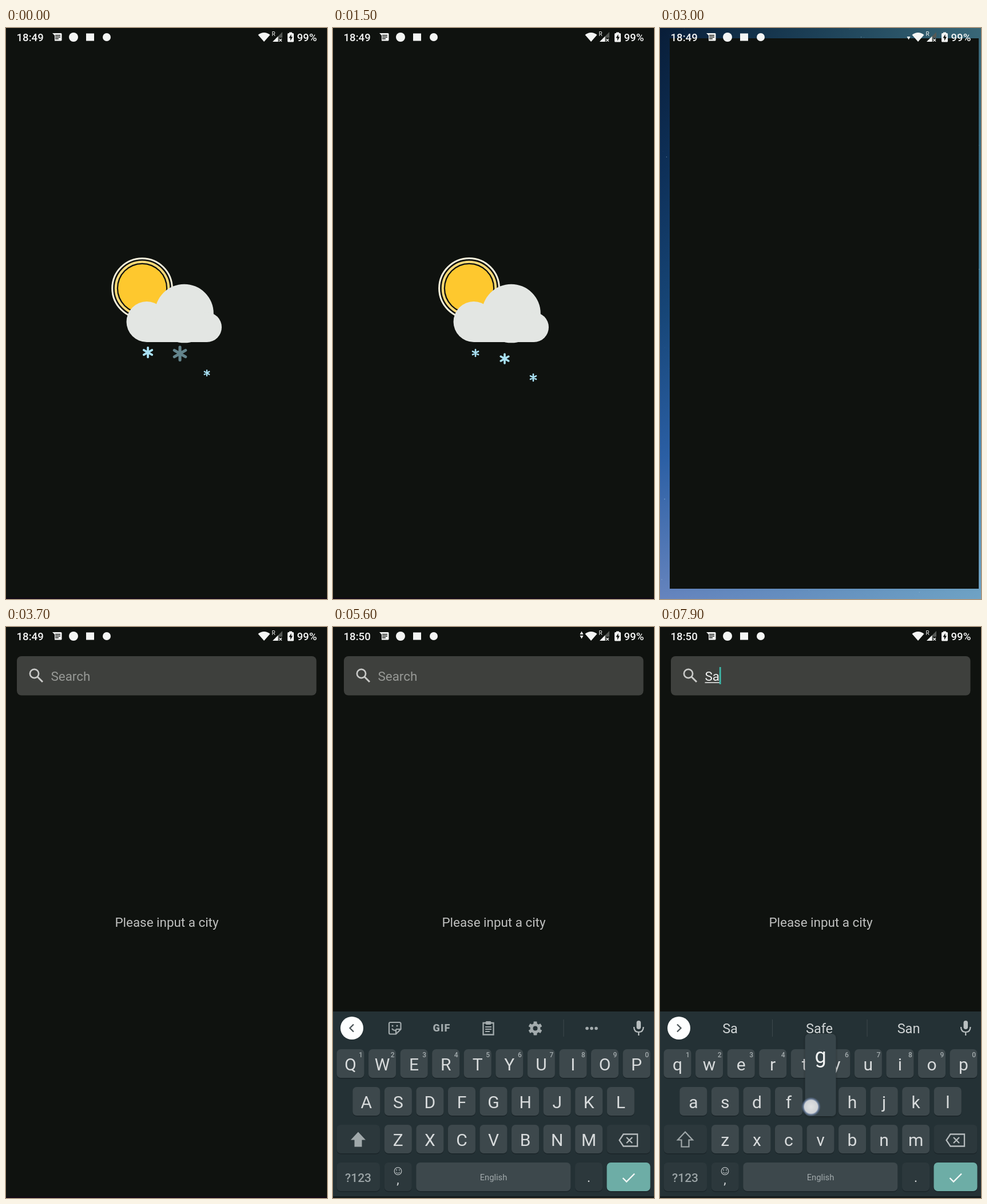
Write an HTML page with a canvas that moves like this. It is 561 by 998 pixels and loops after 8 s.

```html
<!DOCTYPE html>
<html lang="en">
<head>
<meta charset="utf-8">
<title>Weather app</title>
<style>
html, body { margin: 0; width: 100%; height: 100%; overflow: hidden; background: #0f120f; }
canvas { display: block; }
</style>
</head>
<body>
<canvas id="stage" width="561" height="998"></canvas>
<script>
const c = document.getElementById('stage').getContext('2d');
const W = 561, H = 998, LOOP = 8000, STEP = 100, SNOW = 1350, PITCH = 55.56;
const BG = '#0f120f', ICON = '#a3abad', LABEL = '#d8dbdc', KEY = '#3d484c', DARK_KEY = '#2c383c', BOARD = '#243135';

function box(x, y, w, h, r, color) {
  c.fillStyle = color;
  c.beginPath();
  c.roundRect(x, y, w, h, r);
  c.fill();
}
function disc(x, y, r, color) {
  c.fillStyle = color;
  c.beginPath();
  c.arc(x, y, r, 0, 7);
  c.fill();
}
function ring(x, y, r, width, color) {
  c.strokeStyle = color;
  c.lineWidth = width;
  c.beginPath();
  c.arc(x, y, r, 0, 7);
  c.stroke();
}
function shape(path, color, width) {
  const p = new Path2D(path);
  if (width) {
    c.strokeStyle = color;
    c.lineWidth = width;
    c.stroke(p);
  } else {
    c.fillStyle = color;
    c.fill(p);
  }
}
function text(s, x, y, size, color, align = 'left', weight = 400) {
  c.font = `${weight} ${size}px Roboto, sans-serif`;
  c.textAlign = align;
  c.fillStyle = color;
  c.fillText(s, x, y);
}
const between = (t, a, b) => t >= a && t < b;

// Snowflake keys: time, x, y, radius, opacity
const flakes = [
  [[0, 248, 567, 10, 1], [150, 249, 568, 7, 1], [700, 244, 620, 7, 1], [850, 242, 630, 5, 0], [1100, 250, 556, 12, 0]],
  [[0, 304, 569, 13.5, .55], [150, 300, 578, 9.5, 1], [800, 306, 624, 7, 1], [950, 308, 630, 5, 0], [1200, 306, 556, 14, 0]],
  [[0, 351, 603, 6, 1], [150, 350, 611, 7, 1], [400, 346, 626, 6, 1], [500, 345, 630, 5, 0], [700, 352, 560, 12, 0], [850, 351, 568, 9, 1]]
];
function flake(keys, t) {
  const all = [...keys, [SNOW, ...keys[0].slice(1)]];
  const i = all.findIndex(k => k[0] > t);
  const a = all[i - 1], b = all[i], f = (t - a[0]) / (b[0] - a[0]);
  const [, x, y, r, alpha] = a.map((v, j) => v + (b[j] - v) * f);
  c.save();
  c.globalAlpha = alpha;
  c.translate(x, y);
  c.lineCap = 'round';
  c.strokeStyle = '#a9e1f4';
  c.lineWidth = r * .38;
  c.beginPath();
  for (let j = 0; j < 3; j++) {
    const s = Math.sin(j * Math.PI / 3) * r * .83, k = Math.cos(j * Math.PI / 3) * r * .83;
    c.moveTo(s, k);
    c.lineTo(-s, -k);
  }
  c.stroke();
  c.restore();
}

function splash(t) {
  const phase = t % SNOW, grow = .6 * (1 - Math.cos(phase / SNOW * 2 * Math.PI));
  ring(238, 455, 52.3 + grow, 3, '#f6f1dc');
  ring(238, 455, 46.2 + grow / 2, 4, '#fbd977');
  disc(238, 455, 42, '#fec82e');
  flakes.forEach(k => flake(k, phase));
  const cloud = '#e3e6e3';
  disc(246, 513.5, 35.5, cloud);
  disc(311.5, 499, 51.3, cloud);
  disc(351, 523, 26, cloud);
  box(246, 513, 105, 36, 0, cloud);
}

function wallpaper() {
  const down = c.createLinearGradient(0, 0, 0, H);
  ['#081d38', '#0d2f58', '#164577', '#2a5ea4', '#6684be'].forEach((s, i) => down.addColorStop(i / 4, s));
  box(0, 0, W, H, 0, down);
  const across = c.createLinearGradient(0, 0, W, 0);
  across.addColorStop(0, 'rgba(90,190,195,0)');
  across.addColorStop(1, 'rgba(125,205,205,.42)');
  box(0, 0, W, H, 0, across);
  let seed = 7;
  const rnd = () => (seed = seed * 16807 % 2147483647) / 2147483647;
  for (let i = 0; i < 420; i++) {
    disc(rnd() * W, rnd() * H, .3 + rnd() * .6, `rgba(190,220,235,${rnd() * .6})`);
  }
}

// The new window grows towards the full stage
function opening(t) {
  const k = [7, 3, 1, .3, 0][(t - 2800) / STEP];
  wallpaper();
  c.globalAlpha = t < 2900 ? .6 : 1;
  box(17 * k, 18 * k, W - 21 * k, H - 36 * k, 0, BG);
  c.globalAlpha = 1;
}

function statusBar(t) {
  const white = '#f4f5f4';
  text(t < 5600 ? '18:49' : '18:50', 18.5, 23.3, 18.6, white, 'left', 500);
  shape('M81 9H96Q97.500 9 97.500 10.500V21Q97.500 22.500 96 22.500H85V13Z', white);
  [[86, 12, 9], [86, 15, 9], [86, 18, 6]].forEach(([x, y, w]) => box(x, y, w, 1.5, 0, BG));
  disc(118, 16, 8, white);
  box(140, 9.500, 14, 13, 0, white);
  disc(176, 16, 7, white);
  if (between(t, 2900, 3500) || between(t, 5600, 6500)) shape('M431.500 15H437.500L434.500 20.500Z', white);
  if (between(t, 5600, 6500)) shape('M431.500 13H437.500L434.500 7.500Z', white);
  shape('M440.500 12Q451 4 461.500 12L451 24Z', white);
  text('R', 464.5, 14.3, 10, white);
  shape('M466 24L483 7V17H477V24Z', '#555855');
  shape('M466 24L475.500 14.500V24Z', white);
  shape('M477.500 19L482 23.500M482 19L477.500 23.500', white, 1.4);
  box(495, 7.5, 5, 3, 0, white);
  box(492, 9, 11, 15.5, 1.5, white);
  shape('M498.500 11L494.500 17.500H497V22.500L501 15.500H498.500Z', BG);
  text('99%', 508.5, 23.3, 18.6, white, 'left', 500);
}

function searchPage(t, typed) {
  c.globalAlpha = Math.min(1, (t - 3400) / 300);
  box(19, 51, 523.5, 68.5, 8, '#3e403d');
  ring(49.5, 81.5, 7.6, 2.7, '#c9cac8');
  shape('M55 87L64 96', '#c9cac8', 3);
  text(typed || 'Search', 78.5, 94, 22.4, typed ? '#f0f1f0' : '#979996');
  const end = 78.5 + (typed ? c.measureText(typed).width : 0);
  if (typed) box(78.5, 96.5, end - 78.5, 1.5, 0, '#f0f1f0');
  text('Please input a city', 281, 524, 22.4, '#bfc0bf', 'center');
  c.globalAlpha = 1;
  const blinkOn = between(t, 4700, 7500) && (t - 4700) % 1000 < 500;
  if (blinkOn || typed) box(end - .2, 70, 2.8, 30, 0, '#3db9aa');
}

function key(x, y, w, color = KEY) {
  box(x, y + 1.5, w, 50, 7, '#1b2529');
  box(x, y, w, 50, 7, color);
}
function letters(row, x, y, lower) {
  [...row].forEach((ch, i) => {
    const left = x + i * PITCH;
    key(left, y, 48);
    text(lower ? ch.toLowerCase() : ch, left + 24, y + 36.5, 30, LABEL, 'center');
    if (y < 750) text((i + 1) % 10, left + 42, y + 13.5, 12, ICON, 'center', 500);
  });
}

function toolbar() {
  shape('M100 691H116Q118.500 691 118.500 693.500V703L110 711.500H100Q98 711.500 98 709V693.500Q98 691 100 691ZM118 703H112Q110 703 110 705V711M103 702Q108 708 112 702', ICON, 2.2);
  disc(104, 697, 1.5, ICON);
  disc(112, 697, 1.5, ICON);
  c.letterSpacing = '1.2px';
  text('GIF', 190, 707, 18, ICON, 'center', 900);
  c.letterSpacing = '0px';
  shape('M262.500 692H280.500V712.500H262.500Z', ICON, 2.3);
  box(266.5, 689, 10, 6, 2, ICON);
  shape('M266 699H277M266 703H277M266 707H274', ICON, 2);
  ring(353.5, 701.5, 6.5, 5, ICON);
  for (let i = 0; i < 6; i++) {
    c.save();
    c.translate(353.5, 701.5);
    c.rotate(i * Math.PI / 3);
    box(-3, -12, 6, 6, 1, ICON);
    c.restore();
  }
  box(402.5, 686, 1, 30, 0, '#3c484c');
  [444, 452, 460].forEach(x => disc(x, 701.5, 2.8, ICON));
}
function suggestions(typed) {
  const words = typed === 'S' ? ['S', 'So', 'She'] : ['Sa', 'Safe', 'San'];
  words.forEach((w, i) => text(w, 122.5 + i * 156, 710, 23.5, '#d0d4d5', 'center'));
  [196, 361.5].forEach(x => box(x, 686, 1, 30, 0, '#3c484c'));
}

function keyboard(typed) {
  const lower = !!typed;
  box(0, 672, W, 326, 0, BOARD);
  disc(33, 701, 20, '#fdfefe');
  shape(lower ? 'M30 694.500L36.500 701L30 707.500' : 'M36 694.500L29.500 701L36 707.500', '#4a5356', 2.3);
  if (lower) suggestions(typed); else toolbar();
  box(530.5, 688, 7.5, 15, 4, '#b9bfc0');
  shape('M526 699Q526 708 534.200 708T542.500 699M534.200 708V714', '#b9bfc0', 2.2);

  letters('QWERTYUIOP', 6.5, 738, lower);
  letters('ASDFGHJKL', 34.3, 804, lower);
  key(6.5, 870, 75.5, DARK_KEY);
  const arrow = 'M44 882.500L57 896.500H50.500V908.500H37.500V896.500H31Z';
  shape(arrow, '#a0a8aa', lower ? 2.2 : 0);
  letters('ZXCVBNM', 89.8, 870, lower);
  key(478.5, 870, 76, DARK_KEY);
  shape('M507.500 886.500H532V907.500H507.500L500.500 897Z', '#b5bbbd', 2.3);
  shape('M513 892L523 902M523 892L513 902', '#b5bbbd', 2.3);

  key(6.5, 936, 75.5, DARK_KEY);
  text('?123', 44, 970, 21, '#9aa3a5', 'center', 500);
  key(89.8, 936, 48, DARK_KEY);
  ring(113.5, 951, 6.3, 1.3, '#b5bbbd');
  disc(111, 949, 1.1, '#b5bbbd');
  disc(116, 949, 1.1, '#b5bbbd');
  shape('M110 952.500Q113.500 957 117 952.500', '#b5bbbd', 1.2);
  text(',', 113.5, 973, 22, LABEL, 'center');
  key(145.3, 936, 270);
  text('English', 280.5, 967, 14.7, '#a2aaac', 'center');
  key(423, 936, 48, DARK_KEY);
  text('.', 447, 970, 23, LABEL, 'center');
  key(478.5, 936, 76, '#6dada6');
  shape('M506.500 963L513 969.500L527 955.500', '#f4f8f7', 2.4);
}

function popup(ch, x) {
  c.save();
  c.shadowColor = 'rgba(0,0,0,.35)';
  c.shadowBlur = 4;
  c.shadowOffsetY = 1;
  box(x - 27, 711, 54, 144, 7, '#38454a');
  c.restore();
  text(ch, x, 762, 36, '#f0f2f2', 'center');
}
function touch(x, y) {
  const g = c.createRadialGradient(x, y, 0, x, y, 17);
  g.addColorStop(0, '#e0e1e2');
  g.addColorStop(.68, '#cfd2d6');
  g.addColorStop(.8, 'rgba(125,145,180,.75)');
  g.addColorStop(1, 'rgba(90,110,150,0)');
  disc(x, y, 17, g);
}

function draw(t) {
  const typed = t < 7600 ? '' : t < 7800 ? 'S' : 'Sa';
  box(0, 0, W, H, 0, BG);
  box(0, 996, W, 2, 0, '#110715');
  if (t < 2800) splash(t);
  else if (t < 3200) opening(t);
  if (t >= 3500) searchPage(t, typed);
  if (t === 4600) touch(285, 86);
  if (t >= 4900) {
    const i = Math.min(5, (t - 4900) / STEP), show = [.15, .4, .7, .9, .98, 1][i];
    c.save();
    c.translate(0, [180, 90, 38, 13, 3, 0][i]);
    keyboard(typed);
    c.globalAlpha = 1 - show;
    box(0, 672, W, 326, 0, BG);
    c.restore();
    if (i === 5) box(0, 995, W, 3, 0, '#131a1c');
  }
  if (t === 7500) { popup('S', 113.9); touch(112, 836); }
  if (t === 7700) { popup('a', 58.3); touch(56, 836); }
  if (t === 7900) { popup('g', 280.5); touch(264, 838.5); }
  statusBar(t);
}

const start = performance.now();
function tick() {
  const t = (performance.now() - start) % LOOP;
  draw(Math.floor(t / STEP) * STEP);
  requestAnimationFrame(tick);
}
tick();
</script>
</body>
</html>
```
